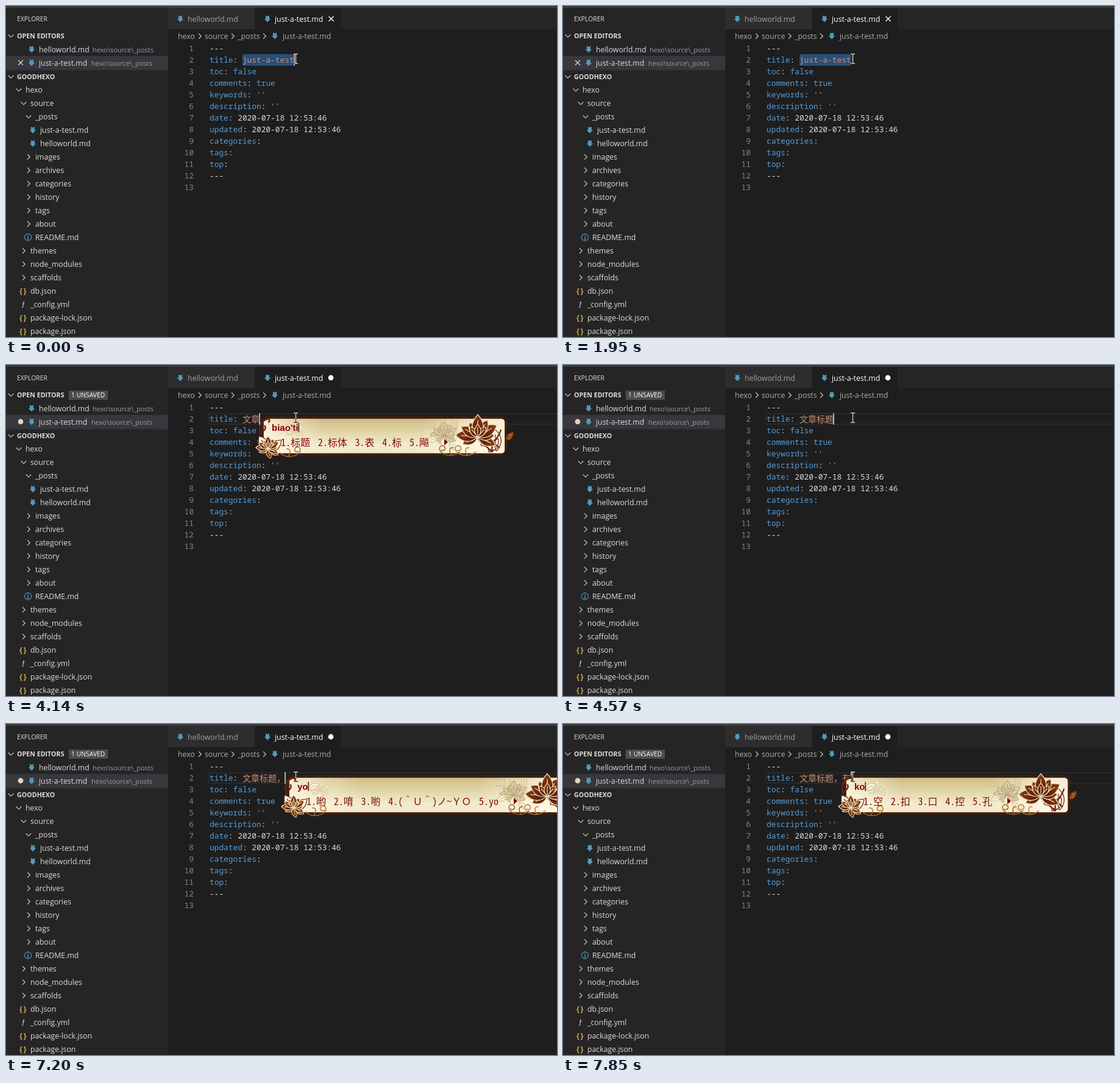
An HTML page that plays this animation: 904 px wide and 543 px high, repeating every 8 s.

```html
<!DOCTYPE html>
<html lang="en">
<head>
<meta charset="utf-8">
<title>Editing a post title</title>
<style>
  html, body { margin: 0; width: 100%; height: 100%; overflow: hidden; background: #1e1e1e; }
  svg { display: block; }
  text { white-space: pre; }
  .ui { font: 12.3px "Open Sans", "Noto Sans", sans-serif; fill: #dcdcdc; }
  .small { font-size: 11px; fill: #9d9d9d; }
  .head { font-size: 10.7px; font-weight: 700; }
  .caps { font-size: 10.4px; }
  .dim { fill: #adadad; }
  .tab { fill: #a0a0a0; }
  .active { fill: #fff; }
  .code { font: 12.83px "Noto Sans Mono", "DejaVu Sans Mono", monospace; fill: #dcdcdc; }
  .num { fill: #858585; text-anchor: end; }
  .key { fill: #569cd6; }
  .str { fill: #ce9178; }
  .han { font: 14px "Noto Sans CJK SC", "Noto Sans CJK", sans-serif; fill: #ce9178; }
  .typed { font: bold 15px "Liberation Sans", Arial, sans-serif; fill: #8b0000; }
  .word { font: 16px "Noto Sans Mono CJK SC", "Noto Sans CJK SC", monospace; fill: #850808; }
  .line { fill: none; stroke: #d0d0d0; stroke-width: 1.15; }
  .mouse { fill: none; stroke: #fff; stroke-width: 1.2; mix-blend-mode: difference; }
</style>
</head>
<body>
<svg id="stage" width="904" height="543" viewBox="0 0 904 543">
  <defs>
    <linearGradient id="paper" x1="0" y1="0" x2="0" y2="1">
      <stop offset="0" stop-color="#cdbb83"/>
      <stop offset=".4" stop-color="#e2d6aa"/>
      <stop offset=".75" stop-color="#f3ebcd"/>
      <stop offset="1" stop-color="#f1e8c8"/>
    </linearGradient>
    <linearGradient id="glow">
      <stop offset="0" stop-color="#fffaea" stop-opacity=".75"/>
      <stop offset=".25" stop-color="#fffaea" stop-opacity="0"/>
      <stop offset=".65" stop-color="#fffaea" stop-opacity="0"/>
      <stop offset=".9" stop-color="#fffaea" stop-opacity=".75"/>
    </linearGradient>
    <linearGradient id="bronze" x1="0" y1="0" x2="0" y2="1">
      <stop offset="0" stop-color="#8a3d12"/>
      <stop offset="1" stop-color="#481208"/>
    </linearGradient>
  </defs>
  <g id="window"></g>
  <g id="editors"></g>
  <g id="title"></g>
  <g id="popup"></g>
  <path class="mouse" d="M472 78.6h2.5l1 1 1-1h2.5M475.5 79.5v14M472 94.4h2.5l1-1 1 1h2.5"/>
</svg>
<script>
const $ = id => document.getElementById(id);
const rect = (x, y, w, h, fill, more = "") =>
  `<rect x="${x}" y="${y}" width="${w}" height="${h}" fill="${fill}" ${more}/>`;
const text = (x, y, s, cls = "ui") => `<text x="${x}" y="${y}" class="${cls}">${s}</text>`;
const at = (x, y, d, attrs) => `<path transform="translate(${x} ${y})" d="${d}" ${attrs}/>`;
const curve = (color, width) => `fill="none" stroke="${color}" stroke-width="${width}"`;
const chevron = (x, y, open) => at(x, y, open ? "M-4.3-2 0 2.3 4.3-2" : "M-2-4.3 2.3 0-2 4.3", 'class="line"');
const cross = (x, y, color) => at(x, y, "M-4-4 4 4M4-4-4 4", curve(color, 1.4));
const dot = (x, y, color) => `<circle cx="${x}" cy="${y}" r="4.4" fill="${color}"/>`;

const icons = {
  md: (x, y) => at(x, y, "M-3-5.5 0-4 3-5.5V0H5.2L0 5.5-5.2 0H-3z", 'fill="#519aba"'),
  info: (x, y) => `<circle cx="${x}" cy="${y}" r="5.6" ${curve("#519aba", 1.1)}/>` +
    at(x, y, "M-1.5-1H.3V3M-1.7 3H1.9M-.4-3.5H.9", curve("#519aba", 1.2)),
  json: (x, y) => text(x - 6, y + 4, "{ }", 'ui" style="font-weight:700;fill:#cba642;letter-spacing:-.6px'),
  yml: (x, y) => text(x - 2, y + 5, "!", 'ui" style="font-weight:700;font-style:italic;font-size:14px;fill:#b3a0d6'),
  open: (x, y) => chevron(x + 1, y, true),
  shut: (x, y) => chevron(x + 1, y, false)
};

// indent level, icon, label
const tree = [
  [0, "open", "hexo"], [1, "open", "source"], [2, "open", "_posts"],
  [3, "md", "just-a-test.md"], [3, "md", "helloworld.md"],
  [2, "shut", "images"], [2, "shut", "archives"], [2, "shut", "categories"],
  [2, "shut", "history"], [2, "shut", "tags"], [2, "shut", "about"],
  [2, "info", "README.md"],
  [1, "shut", "themes"], [1, "shut", "node_modules"], [1, "shut", "scaffolds"],
  [1, "json", "db.json"], [1, "yml", "_config.yml"],
  [1, "json", "package-lock.json"], [1, "json", "package.json"]
];

const source = ["---", "title: ", "toc: false", "comments: true", "keywords: ''", "description: ''",
  "date: 2020-07-18 12:53:46", "updated: 2020-07-18 12:53:46", "categories:", "tags:", "top:", "---", ""];

function highlight(line) {
  const [, key, rest] = line.match(/^(\w*)(.*)$/);
  const value = rest
    .replace(/''/, '<tspan class="str">$&</tspan>')
    .replace(/true|false/, '<tspan class="key">$&</tspan>');
  return `<tspan class="key">${key}</tspan>${value}`;
}

function drawWindow() {
  const rows = tree.map(([level, icon, label], i) => {
    const x = 32 + level * 8, y = 137.5 + i * 22;
    return icons[icon](x - 12, y) + text(x, y + 4.5, label);
  });
  const code = source.map((line, i) => {
    const y = 74 + i * 19;
    return text(308, y, i + 1, "code num") + text(334, y, highlight(line), "code");
  });
  const crumbs = [[282, "hexo", 318], [326, "source", 372], [380, "_posts", 424]].map(([x, s, next]) =>
    text(x, 54, s, "ui dim") + chevron(next, 49.5, false));
  return rect(0, 0, 266, 543, "#252526") + rect(266, 3, 638, 35, "#252526") + rect(0, 0, 904, 3, "#3c3c3c") +
    rect(266, 3, 142, 35, "#2d2d2d") + rect(409, 3, 140, 35, "#1e1e1e") +
    icons.md(286, 21) + text(298, 26, "helloworld.md", "ui tab") +
    icons.md(429, 21) + text(441, 26, "just-a-test.md", "ui active") +
    crumbs.join("") + icons.md(441, 49) + text(454, 54, "just-a-test.md", "ui dim") +
    text(18, 25, "EXPLORER", "ui caps") +
    chevron(8, 49, true) + text(18, 53, "OPEN EDITORS", "ui head") +
    rect(0, 82, 266, 22, "#37373d") + rect(0, 104.5, 266, 1, "#3f3f40") +
    icons.md(42, 71) + text(54, 76, "helloworld.md") + text(142, 76, "hexo\\source\\_posts", "ui small") +
    icons.md(42, 93) + text(54, 98, "just-a-test.md") + text(140, 98, "hexo\\source\\_posts", "ui small") +
    chevron(8, 116, true) + text(18, 120, "GOODHEXO", "ui head") +
    rows.join("") + code.join("");
}

const drawEditors = dirty => dirty
  ? rect(103, 42, 64, 15, "#4d4d4d") + text(107, 53, "1 UNSAVED", "ui caps active") +
    dot(24, 93, "#dcd7c3") + dot(533, 21, "#fff")
  : cross(24, 93, "#d0d0d0") + cross(533.5, 21, "#fff");

function drawTitle(title, caret) {
  const body = title
    ? rect(333, 80, 580, 17, "none", 'stroke="#292929" stroke-width="2"') + text(388, 93.5, title, "han")
    : rect(388, 79, 85, 19, "#264f78", 'rx="3"') + text(387.9, 93, "just-a-test", "code str");
  return body + (caret ? rect(caret, 79, 2, 19, "#aeafad") : "");
}

const petal = (x, y, size, angle, fill, stroke) =>
  `<path transform="translate(${x} ${y}) rotate(${angle}) scale(${size})" fill="${fill}" stroke="${stroke}"
    stroke-width="${1.2 / size}" d="M0 0C-.36-.35-.28-.7 0-1C.28-.7 .36-.35 0 0M0-.1V-.75"/>`;
const flower = (x, y, size, fill, stroke) =>
  [-115, 115, -85, 85, -58, 58, -30, 30, 0].map((a, i) =>
    petal(x, y, size * (.72 + i % 3 * .12), a, fill, stroke)).join("") +
  [-40, 40, 0].map(a => petal(x, y, size * .55, a, fill, stroke)).join("");
const swirl = (x, y, color, flip = 1) =>
  `<path transform="translate(${x} ${y}) scale(${flip} 1)" ${curve(color, 1.5)}
    d="M0 0C10 9 24 8 32 0C38-8 28-13 25-7C23-2 30 0 31-3M14 6C20-2 16-8 11-6"/>`;

const wordWidth = s => [...s].reduce((w, c) => w + (c < "\x7f" ? 8 : 16), 0);

function drawPopup([left, typed, list]) {
  let x = left + 36, words = "";
  list.split(" ").forEach((word, i) => {
    const label = `${i + 1}.${word}`;
    words += text(x, 132.5, label, "word");
    x += wordWidth(label) + 12.75;
  });
  const end = x - 12.75, right = end + 125, bodyLeft = left + 7, width = right - bodyLeft;
  const pale = "#d3c193", cream = "#faf4df", brown = "#6a2410";
  return rect(bodyLeft, 87.5, width, 58, "none", 'rx="6" stroke="#5b230a" stroke-width="6" opacity=".5"') +
    rect(bodyLeft, 87.5, width, 58, "url(#paper)", 'rx="6" stroke="#4a1a08" stroke-width="1.6"') +
    rect(bodyLeft + 1, 88.5, width - 2, 56, "url(#glow)", 'rx="5"') +
    // pale decoration inside the panel
    flower(left + 58, 109, 18, "#efe6c8", "#dccfa4") +
    petal(left + 38, 107, 20, 65, cream, pale) +
    at(right - 100, 88, "M-6 0V29M13 0V36M17 0V27M21 0V32M-38 3H-15V14H-29", curve(pale, 1.3)) +
    flower(right - 100, 116, 24, "#dccfa8", "#b8a475") +
    petal(right - 111, 119, 18, -110, cream, pale) + petal(right - 92, 127, 16, 140, cream, pale) +
    // lotus and leaves on the right
    petal(right - 40, 132, 36, 60, cream, brown) + petal(right - 14, 141, 36, -5, cream, brown) +
    petal(right - 27, 143, 27, 35, cream, brown) + petal(right - 34, 124, 24, 130, cream, brown) +
    at(right - 45, 118, "M0 0C3 12 15 13 23 25M5 11C19 5 24 8 36 18M24 25C20 9 34 4 38-12", curve(brown, 2.2)) +
    flower(right - 45, 118, 38, "url(#bronze)", "#efe0b8") +
    swirl(right - 48, 142, "#b97f32", -1) + swirl(right - 74, 142, "#98601f", -1) +
    petal(right + 2, 124, 18, 38, "#b8681d", "#5d2509") + petal(right + 3, 117, 11, 70, "#d28b2b", "#6f330d") +
    // blossom on the left corner
    at(left + 4, 116, "M0 0C-6-11-2-24 9-27C14-28 15-23 11-22M0-6C7-9 8-14 5-17", curve(brown, 2.4)) +
    swirl(left + 34, 144, "#a9702c") +
    petal(left + 16, 142, 30, -32, cream, brown) + petal(left + 16, 142, 28, 48, cream, brown) +
    petal(left + 14, 136, 18, 165, "#7b3012", "#d6b47b") + petal(left + 17, 139, 17, 120, "#7b3012", "#d6b47b") +
    flower(left + 15, 137, 21, "url(#bronze)", "#efdcb0") +
    text(left + 21, 107.5, typed, "typed") + words +
    at(end + 14, 126.5, "M0 0 6-5V5z", 'fill="#d3c59c"') +
    at(end + 31, 126.5, "M0 0-6-5.5V5.5z", 'fill="#7c0606"');
}

// The composition caret follows the measured text.
function placeTypedCaret() {
  const label = document.querySelector(".typed");
  if (!label) return;
  const x = +label.getAttribute("x") + label.getComputedTextLength();
  label.insertAdjacentHTML("afterend", rect(x, 95, 1.3, 15, "#300"));
}

const we = [472, "we", "我 为 无 位 未"];
const wenzhang = [472, "wen'zhang", "文章 问章 文 问 wenzhang"];
const b = [415, "b", "不 吧 不是 表示 被"];
const bi = [415, "bi", "比 必 笔 毕 闭"];
const biao = [415, "biao", "表 标 飚 彪 biaoqing"];
const biaoti = [415, "biao'ti", "标题 标体 表 标 飚"];
const yo = [457, "yo", "哟 唷 喲 (＾Ｕ＾)ノ~ＹＯ yo"];
const k = [457, "k", "看 可 快 可以 开"];
const ko = [457, "ko", "空 扣 口 控 孔"];

// start in ms, title (empty while the old one is selected), caret x, popup
const steps = [
  [0, "", 472], [640, "", 0], [1070, "", 472],
  [1500, "", 0, we], [1730, "", 0, wenzhang], [1950, "", 0],
  [2170, "文章", 415, b], [2390, "文章", 415, bi], [2610, "文章", 0, biao],
  [3040, "文章", 415, biao], [3490, "文章", 0, biao],
  [3920, "文章", 0, biaoti], [4140, "文章", 415, biaoti],
  [4570, "文章标题", 443], [5240, "文章标题", 0], [5670, "文章标题", 443],
  [6100, "文章标题", 0], [6750, "文章标题", 443],
  [6970, "文章标题，", 457], [7200, "文章标题，", 457, yo],
  [7420, "文章标题，有", 472], [7640, "文章标题，有", 472, k], [7850, "文章标题，有", 472, ko]
];

let shown;
function show(step) {
  if (step === shown) return;
  shown = step;
  const [, title, caret, popup] = step;
  $("editors").innerHTML = drawEditors(title);
  $("title").innerHTML = drawTitle(title, caret);
  $("popup").innerHTML = popup ? drawPopup(popup) : "";
  placeTypedCaret();
}

const start = performance.now();
function frame() {
  const time = (performance.now() - start) % 8000;
  show(steps.findLast(step => step[0] <= time));
  requestAnimationFrame(frame);
}

$("window").innerHTML = drawWindow();
frame();
</script>
</body>
</html>
```
